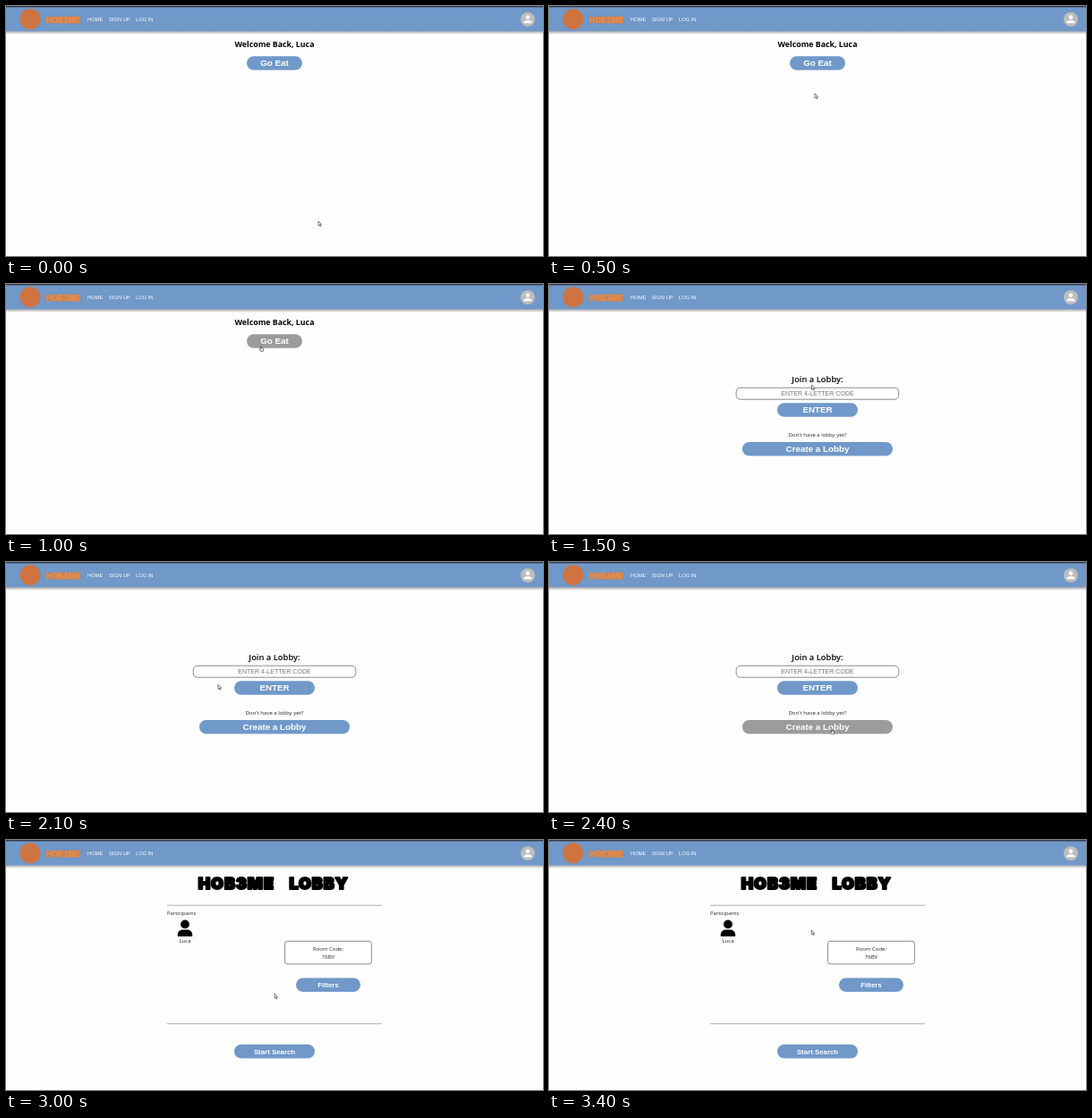
Animation, 600 px wide and 280 px high, one loop 3500 ms. Source, as an HTML page:

```html
<!DOCTYPE html>
<html lang="en">
<head>
<meta charset="utf-8">
<title>Lobby walkthrough</title>
<style>
  html, body { margin: 0; width: 100%; height: 100%; overflow: hidden; background: #fefefe; }
  svg { display: block; width: 600px; height: 280px; }
  text { font-family: "Open Sans", "Noto Sans", sans-serif; font-size: 6px; fill: #222; }
  .mid { text-anchor: middle; }
  .nav { font: 5.76px "Liberation Sans", Arial, sans-serif; fill: #fff; }
  .head { font-weight: 700; font-size: 8.8px; fill: #000; }
  .semi { font-weight: 600; font-size: 9.4px; fill: #000; }
  .btn rect { fill: #7098c9; }
  .btn.hover rect { fill: #9b9b9b; }
  .btn text { font: 700 9.8px "Liberation Sans", Arial, sans-serif; fill: #fff; text-anchor: middle; }
  .btn.small text { font-size: 7.85px; }
  .hint { font: 7.05px "Liberation Sans", Arial, sans-serif; fill: #757575; }
  .box { fill: #fff; stroke: #6c6c6c; stroke-width: .8; }
  .rule { stroke: #a6a6a6; stroke-width: .9; }
  .chunky { font-family: Inter, "Open Sans", sans-serif; font-weight: 900; stroke-linejoin: round; paint-order: stroke; }
  .brand { font-size: 8.6px; fill: #e68d4b; stroke: #d17a42; stroke-width: 1.1; }
  .title { font-size: 18px; fill: #000; stroke: #000; stroke-width: 2.2; letter-spacing: .9px; text-anchor: middle; }
  .pointer { fill: #fff; stroke: #333; stroke-width: .65; stroke-linejoin: round; }
</style>
</head>
<body>
<svg viewBox="0 0 600 280">
  <defs>
    <linearGradient id="shade" x1="0" y1="0" x2="0" y2="1">
      <stop offset="0" stop-color="#8b8b8b" stop-opacity=".75"/>
      <stop offset="1" stop-color="#8b8b8b" stop-opacity="0"/>
    </linearGradient>
  </defs>
  <rect width="600" height="280" fill="#fefefe"/>

  <g id="bar">
    <rect y="28" width="600" height="4" fill="url(#shade)"/>
    <rect width="600" height="28.3" fill="#7098c9"/>
    <rect width="600" height="1.4" fill="#353b46"/>
    <circle cx="27" cy="14.7" r="11.5" fill="#cf7440"/>
    <text class="chunky brand" x="45" y="19.3">HOB3ME</text>
    <text class="nav" x="91" y="17">HOME</text>
    <text class="nav" x="115" y="17">SIGN UP</text>
    <text class="nav" x="145" y="17">LOG IN</text>
    <circle cx="583" cy="15" r="8" fill="#bdbdbd"/>
    <g fill="#fff">
      <circle cx="583" cy="12.6" r="2.3"/>
      <path d="M578.4 19.3v-.9c0-1.6 3-2.4 4.6-2.4s4.6.8 4.6 2.4v.9z"/>
    </g>
  </g>

  <g id="home">
    <text class="head mid" x="300" y="46.3">Welcome Back, Luca</text>
  </g>

  <g id="join">
    <text class="semi mid" x="300" y="109.6">Join a Lobby:</text>
    <rect class="box" x="209.2" y="116.2" width="181.6" height="13" rx="4.5"/>
    <text class="hint mid" x="300" y="125.1">ENTER 4-LETTER CODE</text>
    <text class="mid" x="300" y="171.2">Don't have a lobby yet?</text>
  </g>

  <g id="lobby">
    <text class="chunky title" x="257.3" y="54.8">HOB3ME</text>
    <text class="chunky title" x="349.5" y="54.8">LOBBY</text>
    <path class="rule" d="M180 73.2h240M180 205.8h240"/>
    <text x="180" y="84.2" style="font-size:5.85px">Participants</text>
    <circle cx="200" cy="94.4" r="4.9"/>
    <path d="M191.8 108v-1.6c0-3.6 2.4-5.8 5.6-5.8h5.2c3.2 0 5.6 2.2 5.6 5.8v1.6z"/>
    <text class="mid" x="200" y="115.2">Luca</text>
    <rect class="box" x="311.6" y="113.3" width="96.8" height="25.6" rx="2.6"/>
    <text class="mid" x="360" y="124.4">Room Code:</text>
    <text class="mid" x="360" y="132.8">76BV</text>
  </g>

  <g id="cursor" class="pointer">
    <path id="arrow" d="M0 0v5.1l1.2-1 .8 1.8.9-.4-.8-1.7h1.5z"/>
    <path id="hand" d="M-.5.6q.6-.8 1.1 0v1.8l1.5.3q.6.2.5.8l-.4 2.4h-2.6l-1.3-2 .2-.5 1 .4z"/>
  </g>
</svg>
<script>
const LOOP = 3500, STEP = 100;
const NS = "http://www.w3.org/2000/svg";
const $ = id => document.getElementById(id);

function make(parent, tag, attrs) {
  const el = document.createElementNS(NS, tag);
  for (const key in attrs) el.setAttribute(key, attrs[key]);
  return parent.appendChild(el);
}

function button(page, label, cx, top, width, small) {
  const g = make($(page), "g", { class: small ? "btn small" : "btn" });
  make(g, "rect", { x: cx - width / 2, y: top, width, height: 15.5, rx: 7.75 });
  make(g, "text", { x: cx, y: top + (small ? 10.6 : 11.2) }).textContent = label;
  return g;
}

const goEat = button("home", "Go Eat", 300, 56.2, 62);
button("join", "ENTER", 300, 133.2, 90);
const create = button("join", "Create a Lobby", 300, 177, 168);
button("lobby", "Filters", 360, 154.6, 72, true);
button("lobby", "Start Search", 300, 229.1, 90, true);

// Page start times, and the spans when a button is hovered.
const pages = [["home", 0], ["join", 1100], ["lobby", 2600]];
const hovers = [[goEat, 700, 1100], [create, 2300, 2600]];

// Pointer tip, one place per step.
const path = [
  [349, 241], [346, 232], [338, 208], [325, 172], [310, 132], [297, 98], [288, 78],
  [286, 71], [285, 70], [285, 69.5], [285, 69.5], [285, 72], [285, 76],
  [287, 88], [291, 102], [293.5, 113], [285, 112], [268, 113], [252, 117],
  [242, 125], [238, 132], [237, 137.3], [258, 152], [293, 178], [316, 187], [316, 187],
  [314, 186.5], [313, 186], [310, 183], [305, 178], [300, 172], [294, 164],
  [292, 142], [292, 119], [293.3, 100.8]
];

function draw(time) {
  const step = Math.floor((time % LOOP) / STEP), t = step * STEP;
  const page = pages.filter(p => p[1] <= t).pop()[0];
  for (const [id] of pages) $(id).style.display = id === page ? "" : "none";

  let over = false;
  for (const [el, from, to] of hovers) {
    const on = t >= from && t < to;
    el.classList.toggle("hover", on);
    over = over || on;
  }
  $("arrow").style.display = over ? "none" : "";
  $("hand").style.display = over ? "" : "none";
  $("cursor").setAttribute("transform", `translate(${path[step]})`);
}

const start = performance.now();
function tick() {
  draw(performance.now() - start);
  requestAnimationFrame(tick);
}
tick();
</script>
</body>
</html>
```
